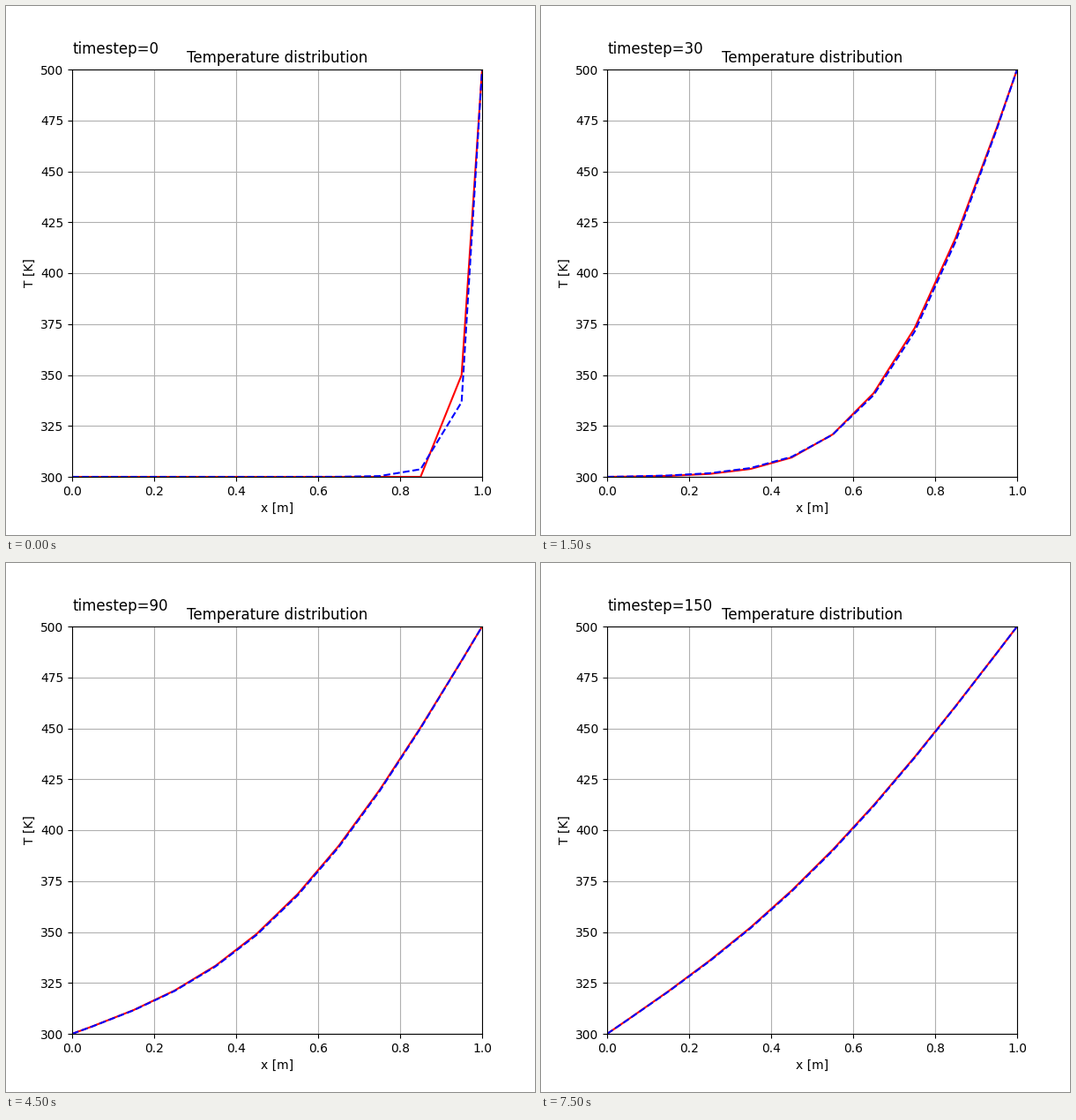
Animation of 600x600 px, one loop 8 s. Source, as a matplotlib script:

```python
import numpy as np
import matplotlib.pyplot as plt
from matplotlib.animation import FuncAnimation

CELLS = 10
R = 0.125                        # alpha * dt / dx**2
T_LEFT, T_RIGHT = 300.0, 500.0
FRAMES, INTERVAL, STRIDE = 16, 500, 10

dx = 1 / CELLS
x = np.concatenate(([0], (np.arange(CELLS) + 0.5) * dx, [1]))

# Finite-volume diffusion operator; wall faces lie half a cell away.
A = 2 * np.eye(CELLS) - np.eye(CELLS, k=1) - np.eye(CELLS, k=-1)
A[0, 0] = A[-1, -1] = 3
source = np.zeros(CELLS)
source[0], source[-1] = 2 * T_LEFT, 2 * T_RIGHT

identity = np.eye(CELLS)
implicit_inv = np.linalg.inv(identity + R * A)


def explicit_step(T):
    return T + R * (source - A @ T)


def implicit_step(T):
    return implicit_inv @ (T + R * source)


def solve(step):
    """Profiles after every time step, walls included."""
    T = np.full(CELLS, T_LEFT)
    profiles = []
    for _ in range((FRAMES - 1) * STRIDE + 1):
        T = step(T)
        profiles.append(np.concatenate(([T_LEFT], T, [T_RIGHT])))
    return profiles


explicit = solve(explicit_step)
implicit = solve(implicit_step)

fig, ax = plt.subplots(figsize=(6, 6), dpi=100)
ax.set(xlim=(0, 1), ylim=(300, 500), xlabel="x [m]", ylabel="T [K]",
       title="Temperature distribution")
ax.grid()
explicit_line, = ax.plot(x, explicit[0], "r-")
implicit_line, = ax.plot(x, implicit[0], "b--")
label = ax.text(0, 1.04, "", transform=ax.transAxes, fontsize=12)


def update(frame):
    n = frame * STRIDE
    explicit_line.set_ydata(explicit[n])
    implicit_line.set_ydata(implicit[n])
    label.set_text(f"timestep={n}")
    return explicit_line, implicit_line, label


anim = FuncAnimation(fig, update, frames=FRAMES, interval=INTERVAL,
                     repeat=True, repeat_delay=0)
plt.show()
```
